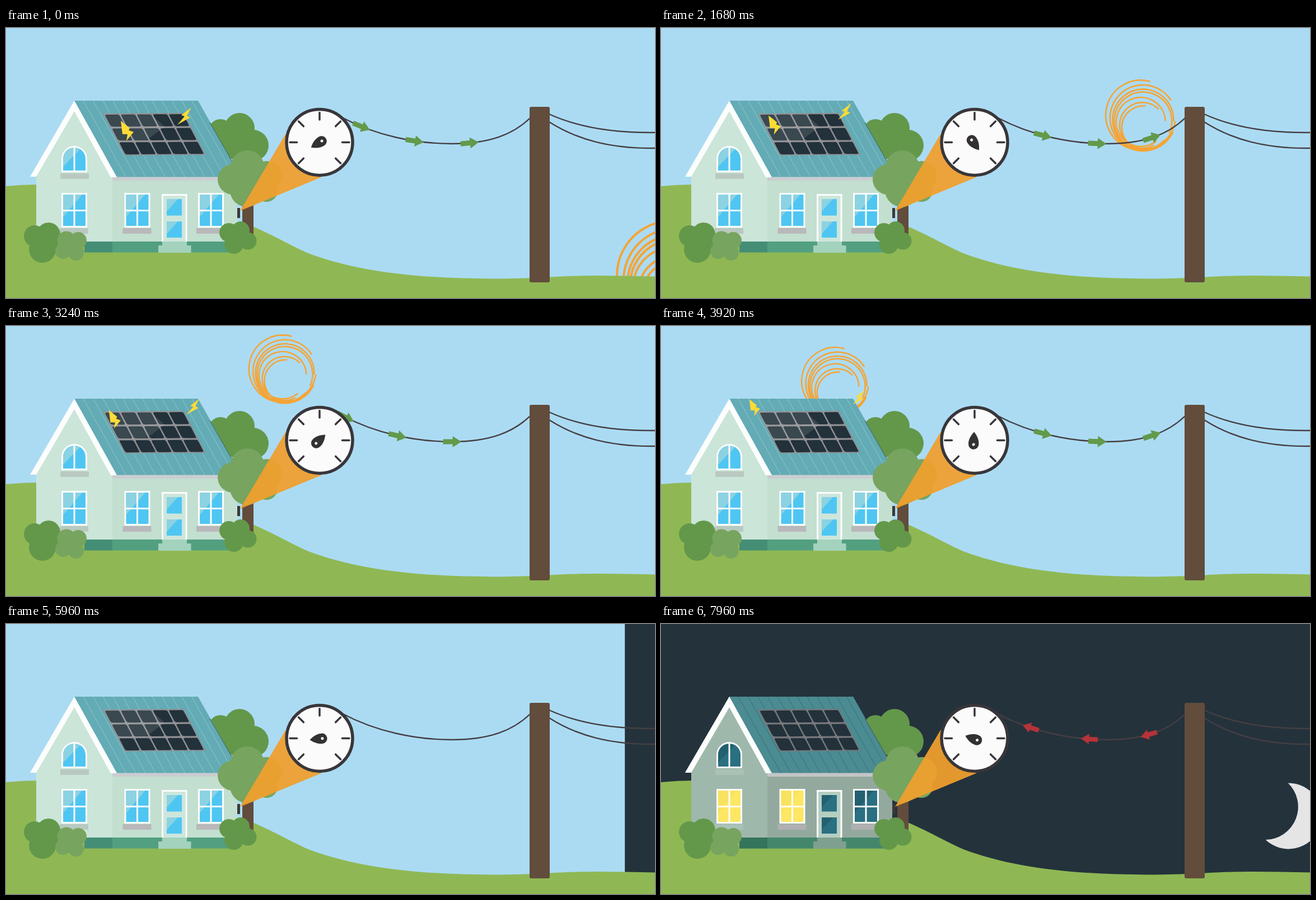
An HTML page that plays this animation: 1159x483 px, repeating every 8000 ms.

```html
<!DOCTYPE html>
<html lang="en">
<head>
<meta charset="utf-8">
<title>Solar metering</title>
<style>
html, body { margin: 0; width: 100%; height: 100%; overflow: hidden; background: #abdbf3; }
svg { display: block; width: 100%; height: 100%; }
.leaf { fill: #63984a; }
.pale { fill: #77a45f; }
.bark { fill: #624c3c; }
.wire { fill: none; stroke: #453f43; stroke-width: 2.4; }
.bolt { fill: #fcdb35; }
</style>
</head>
<body>
<svg id="stage" viewBox="0 0 1159 483"></svg>
<script>
const DAY = {
  gable: '#cbe5d9', front: '#c3dfd0', roof: '#63abb5', seam: '#8fc6cd', fascia: '#cacdd0',
  baseL: '#448e75', baseR: '#52a080', step: '#a3d2bd', door: '#cde6dc', sill: '#b9c9c1', sill2: '#b9b8bb',
  glass: '#4fc6f2', shine: '#8bd2e2', lit: '#4fc6f2', litShine: '#8bd2e2', frame: '#8f9093', cell: '#22313a', gleam: .11
};
const NIGHT = {
  gable: '#9fb8ac', front: '#94a99e', roof: '#4b8b92', seam: '#3b6e77', fascia: '#c2c5c6',
  baseL: '#34745b', baseR: '#44866c', step: '#7fa08f', door: '#b4cfc2', sill: '#a9c2b5', sill2: '#b0b0b2',
  glass: '#2a7082', shine: '#23606f', lit: '#fde763', litShine: '#f9e25f', frame: '#77787b', cell: '#22313a', gleam: 0
};

const times = (n, f) => Array.from({ length: n }, (_, i) => f(i)).join('');
const rect = (x, y, w, h, fill, more = '') => `<rect x="${x}" y="${y}" width="${w}" height="${h}" fill="${fill}" ${more}/>`;
const poly = (points, fill, more = '') => `<polygon points="${points}" fill="${fill}" ${more}/>`;
const blobs = (cls, ...list) =>
  `<g class="${cls}">${list.map(([x, y, r]) => `<circle cx="${x}" cy="${y}" r="${r}"/>`).join('')}</g>`;

function casement(x, glass, shine, sill) {
  return `<g transform="translate(${x})">` +
    rect(0, 295, 46, 62, '#fcfdfd') + rect(3, 298, 40, 56, glass) +
    poly('3,298 37,298 3,338', shine) +
    rect(21.5, 297, 3, 58, '#fcfdfd') + rect(2, 325, 42, 3, '#fcfdfd') +
    rect(-3, 358, 51, 10, sill) + '</g>';
}

function panels(c) {
  return `<g transform="matrix(28.6 -.2 12.9 24.8 174 153.5)">` +
    rect(-.03, -.03, 5.06, 3.03, c.frame) +
    times(15, i => rect(i % 5 + .05, (i / 5 | 0) + .06, .9, .87, c.cell, 'rx=".1"')) +
    poly('0,0 2.9,0 3.4,.95 1.7,2 0,2', '#fff', `opacity="${c.gleam}"`) + '</g>';
}

function house(c) {
  const doorGlass = (y, h) => rect(287, y, 27, h, c.glass) + poly(`287,${y} 307,${y} 287,${y + 22}`, c.shine);
  return poly('122,140 54,262 54,382 190,382 190,258', c.gable) +
    rect(190, 262, 223, 120, c.front) +
    rect(140, 382, 50, 19.5, c.baseL) + rect(190, 382, 215, 19.5, c.baseR) +
    poly('122,130 343,130 420,267 198,267', c.roof) +
    `<g stroke="${c.seam}">` +
    times(12, i => `<path d="M${138 + i * 17.6} 130l76.5 137"/>`) + '</g>' +
    '<path d="M364 169l43 75" stroke="#3c5a4a"/>' +
    rect(190, 266.5, 215, 6.5, c.fascia) +
    poly('122,130 198,267 187,267 122,149 54,266 43,266', '#fcfdfd') +
    panels(c) +
    '<path d="M99 258V234a23 23 0 0 1 46 0V258Z" fill="#fcfdfd"/>' +
    `<path d="M102 255V234a20 20 0 0 1 40 0V255Z" fill="${c.glass}"/>` +
    `<path d="M102 248V234a20 20 0 0 1 30 -17Z" fill="${c.shine}"/>` +
    rect(120.5, 212, 3, 45, '#fcfdfd') + rect(97, 260, 51, 10, c.sill) +
    casement(99, c.lit, c.litShine, c.sill) +
    casement(211.5, c.lit, c.litShine, c.sill2) +
    casement(343, c.glass, c.shine, c.sill2) +
    rect(278, 297, 45.5, 85, '#fcfdfd') + rect(281, 300, 39.5, 82, c.door) +
    doorGlass(306, 29.5) + doorGlass(346, 29) +
    rect(279, 382, 44, 8, c.step) + rect(272, 389, 58.5, 13, c.step);
}

// One open ring, drawn counter-clockwise from angle a round to angle b
function ring([x, y, r, a, b]) {
  const at = deg => [x + r * Math.cos(deg * Math.PI / 180), y + r * Math.sin(deg * Math.PI / 180)];
  return `M${at(a)}A${r} ${r} 0 1 0 ${at(b)}`;
}
const rings = [
  [0, 0, 62, -74, 10], [4, 5, 58.5, -32, 25], [4, 8, 54, 3, 38], [4, 10, 51, 25, 42],
  [0, 12, 43.5, -2, 50], [3, 18, 40.5, -45, 60], [5, 22, 38.5, -85, 70]
].map(ring).join('');

const ticks = times(7, i => `<path d="M40.5 0H53" transform="rotate(${i * 45 + 180 - 45})"/>`);
const arrow = id => `<path id="${id}" d="M-16 -4.5H1V-10L16.5 0L1 10V4.5H-16Z"/>`;

document.getElementById('stage').innerHTML =
  rect(0, 0, 1159, 483, '#abdbf3') +
  `<path id="sun" d="${rings}" fill="none" stroke="#f5a436" stroke-width="2.6"/>` +
  rect(0, 0, 1160, 483, '#24323b', 'id="dark"') +
  '<path id="moon" d="M0 -59A59 59 0 1 1 -40 42.5A59 59 0 0 0 0 -59Z" fill="#e5e5e6"/>' +
  `<path d="M0 283Q30 280 60 280L380 338L443 356C480 372 510 390 540 403C630 437 740 448 870 448.5
    C960 448.5 980 443 1060 443Q1110 443 1159 444.5V483H0Z" fill="#8fb854"/>` +
  '<path class="wire" id="line" d="M600 160C660 192 730 207 797 207C864 207 906 190 936 161"/>' +
  '<path class="wire" d="M970 154C1020 177 1080 188 1159 187M970 168C1020 200 1080 216 1159 215"/>' +
  '<rect class="bark" x="935" y="141" width="36" height="314" rx="3"/>' +
  blobs('leaf', [417, 179, 27], [441, 210, 28], [383, 184, 21], [410, 205, 30]) +
  '<rect class="bark" x="422" y="310" width="20" height="60"/>' +
  `<g>${house(DAY)}</g><g id="night">${house(NIGHT)}</g>` +
  blobs('pale', [431, 249, 30], [405, 271, 27], [466, 265, 27], [430, 290, 30], [465, 291, 20]) +
  rect(413, 322, 5, 18, '#3a383b') +
  blobs('leaf', [51, 372, 19], [76, 369, 21], [65, 396, 24], [82, 388, 16],
    [398, 366, 17], [419, 362, 16], [432, 381, 15.5], [407, 387, 17], [416, 376, 14]) +
  blobs('pale', [108, 380, 16.5], [129, 380, 15], [102, 399, 14], [125, 402, 14], [115, 392, 15]) +
  poly('418,327 499,190 560,204 563,267', '#f2a02e', 'opacity=".93"') +
  `<g id="arrows">${times(3, i => arrow('a' + i))}</g>` +
  `<g transform="translate(560 204.5)">
    <circle r="59" fill="#fbfbfb" stroke="#38363a" stroke-width="5.5"/>
    <g stroke="#38363a" stroke-width="3.5" stroke-linecap="round">${ticks}</g></g>` +
  `<g id="needle"><path d="M16 0C9 -6 2 -9.5 -6 -9.2A9.2 9.2 0 0 0 -6 9.2C2 9.5 9 6 16 0Z" fill="#333133"/>
    <circle cx="-6.5" r="2.5" fill="#fbf8e6"/></g>` +
  `<g class="bolt"><path id="b0" d="M-11 -18L5 -5L3 -1L12 2L-1 18L1 6L-8 6Z"/>
    <path id="b1" d="M13 -15L-5 -1L1 1L-12 16L11 3L5 0Z"/></g>`;

const $ = id => document.getElementById(id);
const set = (id, x, y, turn = 0, size = 1) =>
  $(id).setAttribute('transform', `translate(${x} ${y}) rotate(${turn}) scale(${size})`);
const show = (id, on) => $(id).style.display = on ? '' : 'none';
const mod = (a, n) => (a % n + n) % n;
const clamp = v => Math.min(1, Math.max(0, v));

const LOOP = 8000, SUNSET = 5360, MOONRISE = 7500, BOLT = 1340;
const line = $('line');
const height = s => 443 - 233 * s + 37 * s * s;

function placeArrow(id, d, turn) {
  const p = line.getPointAtLength(d), q = line.getPointAtLength(d + 1);
  set(id, p.x, p.y, Math.atan2(q.y - p.y, q.x - p.x) * 180 / Math.PI + turn, turn ? .93 : 1);
}

function draw(t) {
  const day = t < SUNSET, night = t >= MOONRISE;

  // The sun rests briefly on the horizon, then catches up
  const s = (t < 160 ? 0 : Math.min(t, (t - 160) * 1.5)) / 1000;
  const sunX = 1189 - 197.6 * s - 10 * s * (s - 1.68) - 1.38 * s * (s - 1.68) * (s - 2.68);
  set('sun', sunX, height(s), 0, (60 + 38 * Math.exp(-1.6 * s)) / 62);
  show('sun', day);

  $('dark').setAttribute('x', Math.max(0, 1106 - (t - 5960) * .853));
  $('night').style.opacity = clamp((t - 7260) / 240);

  const m = (t - MOONRISE) / 1000;
  set('moon', 1188 - 148 * m, height(m));
  show('moon', night);

  const h = Math.min(t, SUNSET) / 1000;
  set('needle', 558.5, 205.5, 149 - 54 * h - 1.6 * h * h + Math.max(0, m) * 57);

  show('arrows', day || night);
  $('arrows').setAttribute('fill', day ? '#62994a' : '#b5333a');
  for (let i = 0; i < 3; i++) {
    if (day) placeArrow('a' + i, mod(38 + .264 * t + 98.5 * i, 295.5), 0);
    else placeArrow('a' + i, mod(66 - .264 * (t - 7960) + 107 * i, 321), 180);
  }

  const p = t % BOLT / BOLT, size = 1 - .18 * p;
  set('b0', 216 - 53 * p, 184 - 41 * p, 0, size);
  set('b1', 318 + 37 * p, 157 - 32 * p, 0, size);
  show('b0', day);
  show('b1', day);
}

const start = performance.now();
function tick() {
  draw((performance.now() - start) % LOOP);
  requestAnimationFrame(tick);
}
tick();
</script>
</body>
</html>
```
